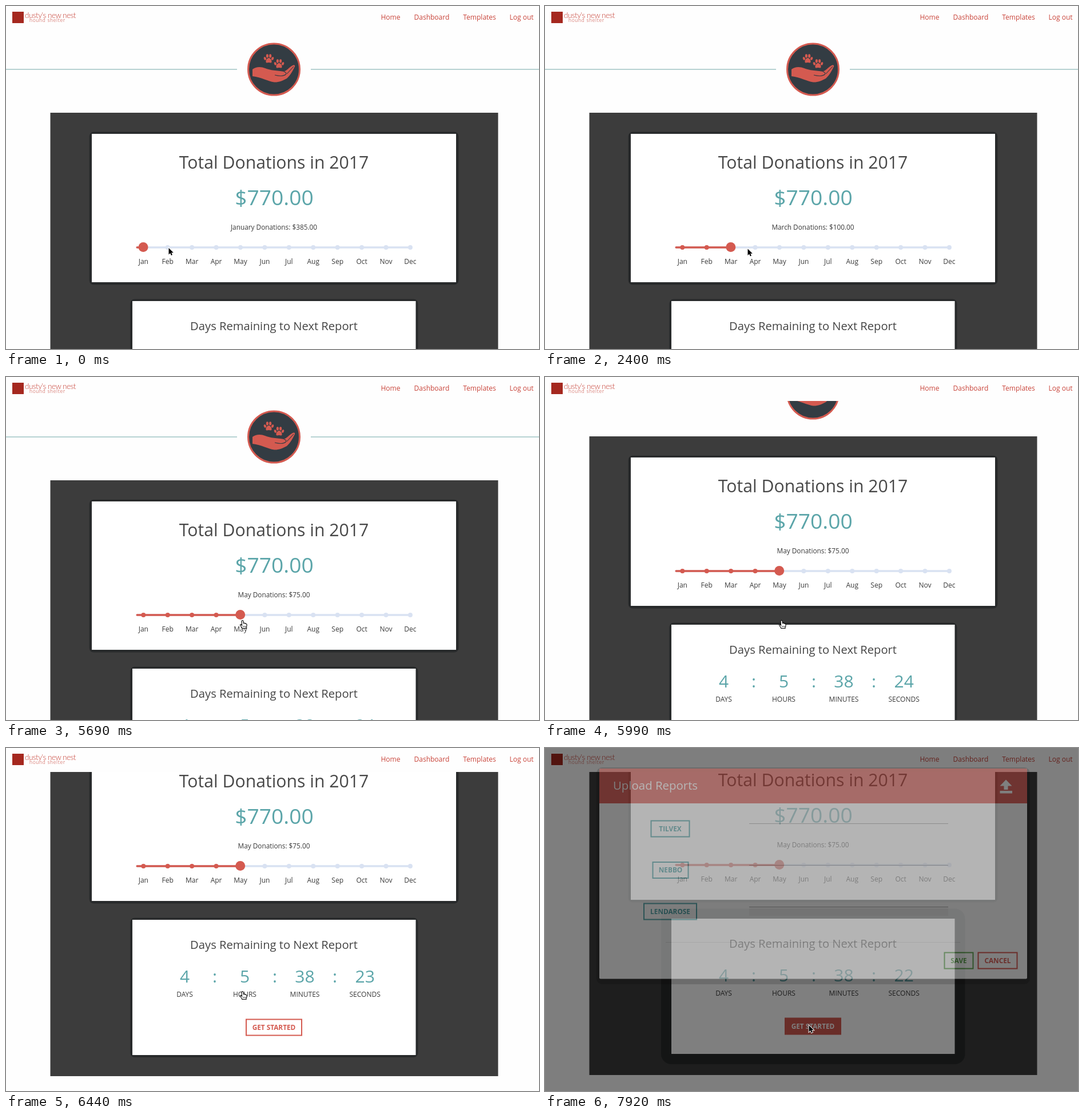
These frames come from a looping animation (932x601 px, 8000 ms). An HTML page:

```html
<!DOCTYPE html>
<html lang="en">
<head>
<meta charset="utf-8">
<title>Donation dashboard</title>
<style>
  html, body { margin: 0; width: 100%; height: 100%; overflow: hidden; background: #fefefe; }
  svg { display: block; width: 932px; height: 601px; font: 12px "Open Sans", sans-serif; }
  text { fill: #3a3a3a; }
  .mid { text-anchor: middle; }
  .nav text { fill: #c9453b; }
  .h1 { font-size: 30.2px; fill: #484848; }
  .h2 { font-size: 20.15px; fill: #444; }
  .teal { fill: #5ba5a9; }
  .sum { font-size: 37.2px; }
  .note { font-size: 11.8px; }
  .num text { font-size: 30px; }
  .btn text { font-size: 11.8px; font-weight: 700; text-anchor: middle; }
  .btn rect { fill: none; stroke-width: 2; }
  .red { fill: #d45a50; }
  .rail { fill: #d9e2f2; }
  .shade { fill: #282a2b; }
  .brand { font-family: Lato, sans-serif; font-weight: 300; fill: #c4382d; }
</style>
</head>
<body>
<svg viewBox="0 0 932 601">
  <defs>
    <clipPath id="below"><rect y="42" width="932" height="559"/></clipPath>
    <g id="paw">
      <path d="M0 -1.5C3 -1.5 5.5 3 5 5.5C4.5 8 2 6.5 0 6.5S-4.5 8 -5 5.5C-5.5 3 -3 -1.5 0 -1.5Z"/>
      <ellipse cx="-6.6" cy="-.5" rx="2" ry="2.9" transform="rotate(-20 -6.6 -.5)"/>
      <ellipse cx="-2.6" cy="-5" rx="2.1" ry="3.2"/>
      <ellipse cx="2.6" cy="-5" rx="2.1" ry="3.2"/>
      <ellipse cx="6.6" cy="-.5" rx="2" ry="2.9" transform="rotate(20 6.6 -.5)"/>
    </g>
  </defs>

  <g clip-path="url(#below)">
    <g id="page">
      <path d="M0 111H404M533 111H932" stroke="#6fa6a6" stroke-width="1"/>
      <circle cx="468.5" cy="111" r="45" fill="#333c43" stroke="#d45a50" stroke-width="3"/>
      <g class="red">
        <use href="#paw" x="459.5" y="92.5"/>
        <use href="#paw" x="477.5" y="101.5"/>
        <path d="M431 111C437 106 446 106 453 109C462 113 474 113 486 115C491 113 495 108 499 105.500C503 102.500 506 103 505 106C502 112 498 121 491 127C484 131 476 134 469 133.500C458 132 447 125 431 123Z"/>
      </g>
      <path d="M470 121C478 123 486 123 489.500 119.500C490.500 117 489 115.500 486 115.500M491 119L503 106" fill="none" stroke="#333c43" stroke-width="1.100"/>

      <rect x="77.500" y="187" width="783" height="604" fill="#3c3c3c"/>
      <rect class="shade" x="145.500" y="220.500" width="646" height="268" rx="8"/>
      <rect x="150" y="224" width="637" height="260" fill="#fff"/>
      <text class="mid h1" x="468.500" y="284.800">Total Donations in 2017</text>
      <text class="mid teal sum" x="469" y="349.300">$770.00</text>
      <text class="mid note" id="note" x="468.500" y="392.200"></text>
      <rect class="rail" x="227.500" y="421.300" width="480" height="3.500" rx="1.700"/>
      <rect class="red" id="track" x="227.500" y="421.300" height="3.500" rx="1.700"/>
      <g id="dots"></g>
      <circle class="red" id="knob" cy="422.500" r="8.500"/>

      <rect class="shade" id="lift" rx="8"/>
      <rect x="221" y="517" width="495.500" height="237" fill="#fff"/>
      <text class="mid h2" x="468.500" y="568.200">Days Remaining to Next Report</text>
      <g class="mid num">
        <text class="teal" x="312.500" y="626.700">4</text>
        <text class="teal" x="365" y="626.700">:</text>
        <text class="teal" x="417.500" y="626.700">5</text>
        <text class="teal" x="470" y="626.700">:</text>
        <text class="teal" x="522.500" y="626.700">38</text>
        <text class="teal" x="575" y="626.700">:</text>
        <text class="teal" id="secs" x="627.700" y="626.700"></text>
      </g>
      <g class="mid">
        <text x="312.500" y="652.300">DAYS</text>
        <text x="417.500" y="652.300">HOURS</text>
        <text x="522.500" y="652.300">MINUTES</text>
        <text x="627.700" y="652.300">SECONDS</text>
      </g>
      <g class="btn">
        <rect x="420" y="691.500" width="97" height="28" stroke="#d45a50"/>
        <rect id="fill" x="420" y="691.500" width="97" height="28" style="fill:#d45a50"/>
        <text id="start" x="468.500" y="709.500">GET STARTED</text>
      </g>
    </g>
  </g>

  <rect x="11" y="10" width="20" height="20" fill="#a5281f"/>
  <text class="brand" x="33" y="21" font-size="13.500" letter-spacing="-.5">dusty's new nest</text>
  <text class="brand" x="41" y="27.500" font-size="9" letter-spacing=".7">hound shelter</text>
  <g class="nav">
    <text x="655.500" y="24.300">Home</text>
    <text x="713.500" y="24.300">Dashboard</text>
    <text x="799.300" y="24.300">Templates</text>
    <text x="880.500" y="24.300">Log out</text>
  </g>

  <g id="dialog">
    <rect width="932" height="601" fill="#000" opacity=".5"/>
    <g opacity=".43">
      <rect x="90" y="34" width="758" height="380" rx="10" fill="#000" opacity=".35"/>
      <rect x="95" y="36" width="748" height="368.500" rx="2" fill="#fafafa"/>
      <path d="M95 97V38Q95 36 97 36H841Q843 36 843 38V97Z" fill="#d9534a"/>
      <text x="119" y="73.200" font-size="20.400" style="fill:#fff">Upload Reports</text>
      <path d="M806 55.500L816.500 66.500H809.500V73H802.500V66.500H795.500ZM795.500 75H817V79.500H795.500Z" fill="#fff"/>
      <path d="M357 132.500H705M357 205.500H705M357 278.500H705" stroke="#9e9e9e"/>
      <rect x="357" y="279" width="348" height="15" fill="#000" opacity=".04"/>
      <path d="M211 340.500H726" stroke="#ddd"/>
      <g class="btn" id="choices"></g>
    </g>
  </g>

  <g id="arrow"><path d="M0 0V11.500L2.700 9L4.400 13L6.400 12.100L4.700 8.300H8.300Z" fill="#000" stroke="#fff" stroke-width="1.800" paint-order="stroke"/></g>
  <g id="hand"><path d="M-1.500 1Q0 -1 1.500 1L2 5Q3 4 4.200 5.300Q5.500 4.800 6 6Q7.600 5.800 7.600 7.500Q7.800 10 6.500 12V14H-.5Q-1.500 11.500 -4 8.500Q-4.500 6.800 -2.600 7L-1 8.600Z" fill="#fff" stroke="#000" stroke-width="1.100"/><path d="M1.200 9.500V12M3.200 9.500V12M5.200 9.500V12" stroke="#000" stroke-width=".7"/></g>
</svg>
<script>
const $ = id => document.getElementById(id);
const set = (el, attrs) => { for (const k in attrs) el.setAttribute(k, attrs[k]); return el; };
const add = (parent, tag, attrs, text = '') => {
  const el = set(document.createElementNS('http://www.w3.org/2000/svg', tag), attrs);
  el.textContent = text;
  return parent.appendChild(el);
};

const LOOP = 8000, STEP = 42.42, FIRST = 240.3;
const months = 'Jan Feb Mar Apr May Jun Jul Aug Sep Oct Nov Dec'.split(' ');
const gifts = ['January Donations: $385.00', 'February Donations: $90.00',
  'March Donations: $100.00', 'April Donations: $20.00', 'May Donations: $75.00'];

const dots = months.map((name, i) => {
  const x = FIRST + i * STEP;
  add($('dots'), 'text', { x, y: 451.8, class: 'mid' }, name);
  return add($('dots'), 'circle', { cx: x, cy: 423, r: 4 });
});

const button = (x, y, width, color, label) => {
  add($('choices'), 'rect', { x: x + 1, y: y + 1, width: width - 2, height: 28, stroke: color });
  add($('choices'), 'text', { x: x + width / 2, y: y + 19, style: 'fill:' + color }, label);
};
button(184.5, 126.5, 69, '#3f9a9e', 'TILVEX');
button(187.5, 199, 64, '#3f9a9e', 'NEBBO');
button(172, 271.5, 94, '#3f9a9e', 'LENDAROSE');
button(697.5, 357.5, 52, '#4c9a3c', 'SAVE');
button(756.5, 357.5, 70, '#d0453c', 'CANCEL');

// Each track holds [start time, value...]; values hold until the next entry.
const month = [[0, 0], [320, 1], [1810, 2], [3450, 3], [4800, 4]];
const scroll = [[0, 0], [5690, 6], [5840, 38], [5990, 83], [6140, 143], [6290, 190], [6440, 216], [6590, 218]];
const seconds = [[0, 24], [6290, 23], [7180, 22]];
const hover = [[0, 0], [7180, .4], [7330, .95], [7620, 1]];
const pointer = [
  [0, 284.5, 424, 'arrow'], [150, 285, 425, 'hand'],
  [760, 294, 424, 'arrow'], [910, 309, 424, 'arrow'], [1060, 321, 425, 'arrow'], [1210, 326, 426, 'hand'],
  [2250, 337, 425, 'arrow'], [2400, 354.5, 425.5, 'arrow'], [2550, 360, 425, 'arrow'],
  [2700, 364, 425, 'hand'], [2850, 367, 425.5, 'hand'], [3000, 368, 426, 'hand'],
  [3750, 386, 425, 'arrow'], [3900, 403, 425, 'arrow'], [4050, 413.5, 426.5, 'hand'],
  [6880, 421, 438, 'arrow'], [7030, 439, 461, 'arrow'], [7180, 455, 479, 'hand'],
  [7330, 461.5, 486, 'hand'], [7920, 461.5, 486, 'arrow']];
const at = (track, t) => track.findLast(e => e[0] <= t).slice(1);

function draw(t) {
  const [m] = at(month, t), [fill] = at(hover, t), [x, y, shape] = at(pointer, t);
  const open = t >= 7920, grow = open ? 18 : 4;
  set($('page'), { transform: `translate(0 ${-at(scroll, t)[0]})` });
  $('note').textContent = gifts[m];
  $('secs').textContent = at(seconds, t)[0];
  set($('knob'), { cx: FIRST - .3 + m * STEP });
  set($('track'), { width: FIRST - 227.5 + m * STEP });
  dots.forEach((d, i) => set(d, { class: i <= m ? 'red' : 'rail' }));
  set($('lift'), { x: 221 - grow, y: 517.5 - grow, width: 495.5 + 2 * grow, height: 236.5 + 2 * grow, rx: open ? 18 : 8 });
  set($('fill'), { opacity: fill });
  $('start').style.fill = fill > .3 ? '#fff' : '#d45a50';
  $('dialog').style.display = open ? '' : 'none';
  for (const id of ['arrow', 'hand']) {
    set($(id), { transform: `translate(${x} ${y})` });
    $(id).style.display = id === shape ? '' : 'none';
  }
}

const begin = performance.now();
function tick() {
  draw((performance.now() - begin) % LOOP);
  requestAnimationFrame(tick);
}
tick();
</script>
</body>
</html>
```
